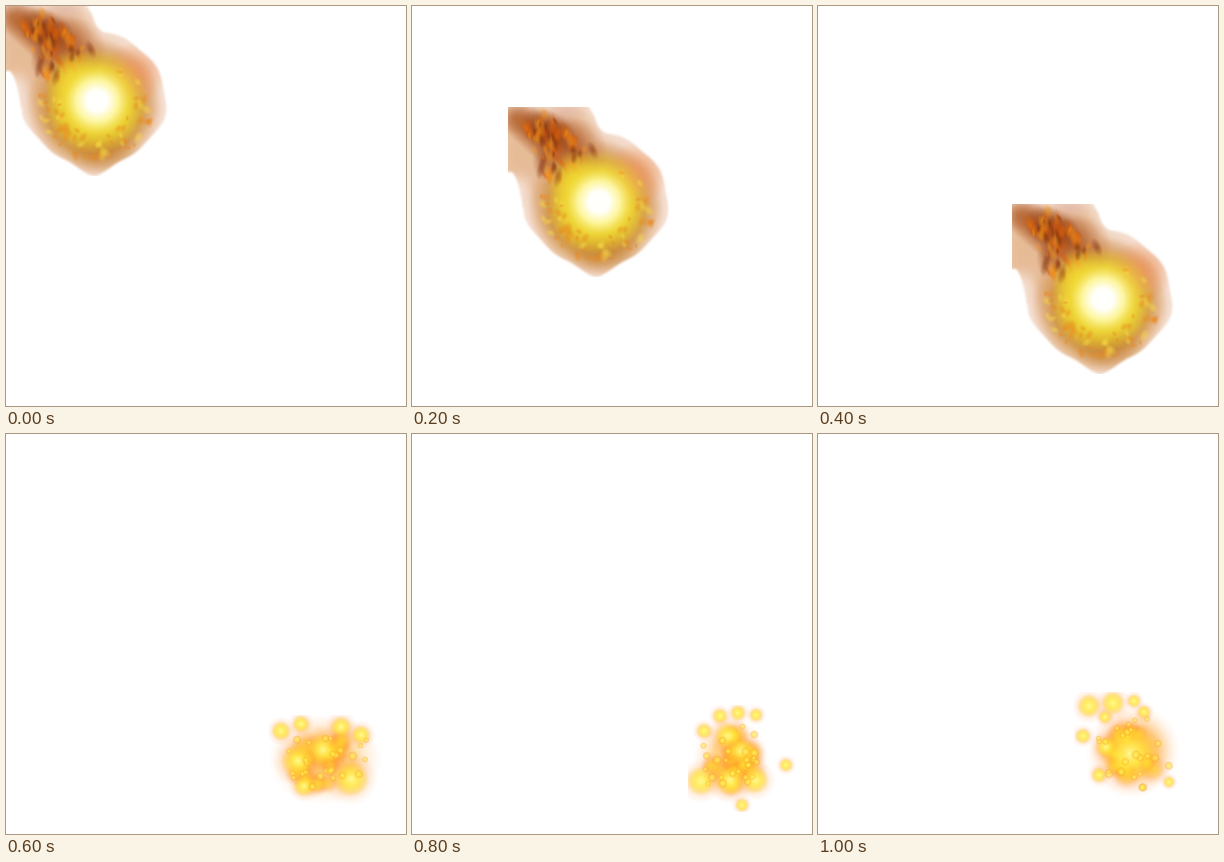
Recreate the animation shown at these times as an HTML page with a canvas. Size 400 by 400 pixels, loop 1.2 s.

```html
<!DOCTYPE html>
<html lang="en">
<head>
<meta charset="utf-8">
<title>Fireball</title>
<style>
  html, body { margin: 0; width: 100%; height: 100%; overflow: hidden; background: #fff; }
  canvas { position: absolute; left: 0; top: 0; opacity: 0; }
</style>
</head>
<body>
<script>
const LOOP = 1200, STEPS = 6;

function layer(x, y, w, h) {
  const c = document.createElement('canvas');
  c.width = w;
  c.height = h;
  c.style.left = x + 'px';
  c.style.top = y + 'px';
  document.body.append(c);
  return c.getContext('2d');
}

function seeded(s) {
  return () => {
    s = (s * 1664525 + 1013904223) % 4294967296;
    return s / 4294967296;
  };
}

// Radial glow; stops are [position, rgb, alpha]
function glow(g, x, y, r, stops, stretch = 1, turn = 0) {
  const grad = g.createRadialGradient(0, 0, 0, 0, 0, r);
  stops.forEach(([at, rgb, a]) => grad.addColorStop(at, `rgba(${rgb},${a})`));
  g.save();
  g.translate(x, y);
  g.rotate(turn);
  g.scale(stretch, 1);
  g.fillStyle = grad;
  g.beginPath();
  g.arc(0, 0, r, 0, 7);
  g.fill();
  g.restore();
}

const fade = (rgb, a) => [[0, rgb, a], [.4, rgb, a * .7], [1, rgb, 0]];

// Ball that narrows towards its lower corners, joined to the tail
function silhouette(g, scale) {
  g.save();
  g.translate(88, 98);
  g.scale(scale, scale);
  g.beginPath();
  for (let a = 0; a < 6.28; a += .05) {
    const r = 72 - 12 * Math.max(0, Math.sin(a) * Math.abs(Math.sin(2 * a))) + Math.sin(9 * a);
    g.lineTo(Math.cos(a) * r, Math.sin(a) * r);
  }
  g.closePath();
  g.fill();
  g.beginPath();
  g.moveTo(-110, -33);
  g.lineTo(-84, -33);
  g.quadraticCurveTo(-77, -26, -73, 4);
  g.lineTo(18, -69);
  g.quadraticCurveTo(2, -72, -1, -88);
  g.lineTo(-14, -110);
  g.lineTo(-110, -110);
  g.fill();
  g.restore();
}

function drawBall(g) {
  const rnd = seeded(11);
  g.filter = 'blur(1px)';
  g.fillStyle = '#f5dfd1';
  silhouette(g, 1);
  g.globalCompositeOperation = 'source-atop';
  g.filter = 'blur(6px)';
  g.fillStyle = 'rgba(226,176,132,.75)';
  silhouette(g, .85);
  g.filter = 'none';

  glow(g, 88, 101, 68, [[0, '240,215,50', 1], [.5, '222,180,44', 1], [.7, '206,146,58', .8], [1, '215,155,105', 0]]);
  glow(g, 128, 68, 32, fade('236,146,90', .8));
  glow(g, 98, 146, 26, fade('190,118,40', .5), 1.5);

  // Smoke widening from the corner into the ball
  for (let i = 0; i < 8; i++) {
    const t = i / 7;
    glow(g, 6 + 60 * t, 10 + 34 * t, 18 + 16 * t, fade('168,78,24', .5));
  }
  glow(g, 40, 24, 20, fade('122,42,10', .6), 1.5, .4);
  glow(g, 36, 54, 20, fade('150,66,20', .55), .6);
  glow(g, 58, 4, 14, fade('222,176,158', .6), 1.6);
  glow(g, 64, 70, 30, fade('240,206,44', .85), .8, .6);

  // Flames curling along the tail
  const colors = ['228,112,12', '244,150,24', '130,48,10', '210,88,10'];
  for (let i = 0; i < 70; i++) {
    const t = rnd(), side = (rnd() - .5) * (20 + 44 * t);
    glow(g, 24 + 40 * t + side * .75, 10 + 52 * t - side * .65, 2 + rnd() * 3,
      fade(colors[i % 4], .55), 1.5 + rnd() * 1.5, .9 + rnd());
  }

  glow(g, 91, 95, 52, [[0, '255,255,255', 1], [.2, '255,255,250', 1], [.4, '255,250,170', .92],
    [.62, '244,226,62', .7], [1, '235,205,40', 0]]);

  // Embers around the rim
  for (let i = 0; i < 60; i++) {
    const a = rnd() * 4.2 - .9, r = 34 + rnd() * 24;
    glow(g, 90 + Math.cos(a) * r, 96 + Math.sin(a) * r, 2 + rnd() * 3,
      fade(i % 3 ? '232,136,28' : '250,222,70', .5), 1.5, rnd() * 3);
  }
}

// Crop box, haze as x, y, radius, stretch, and the largest puffs as x, y, radius
const BLASTS = [
  {
    box: [263, 281, 115, 91], haze: [319, 325, 46, 1.25], seed: 5,
    puffs: [[317, 316, 17], [292, 327, 17], [345, 345, 18], [275, 297, 10], [295, 290, 9], [335, 293, 11],
      [355, 301, 10], [298, 352, 11]]
  },
  {
    box: [276, 271, 107, 107], haze: [319, 326, 43, .9], seed: 8,
    puffs: [[289, 347, 15], [318, 346, 16], [343, 346, 14], [316, 302, 14], [329, 317, 14], [308, 282, 8],
      [326, 279, 8], [344, 281, 7], [292, 297, 8], [374, 331, 7], [330, 371, 7]]
  },
  {
    box: [256, 258, 105, 105], haze: [317, 316, 46, 1], seed: 21,
    puffs: [[312, 320, 30], [288, 313, 11], [271, 272, 12], [295, 269, 12], [316, 267, 7], [287, 283, 7],
      [326, 278, 7], [265, 302, 8], [281, 341, 8], [351, 348, 6]]
  }
];

const HALO = [[0, '255,190,110', .5], [.5, '255,190,120', .4], [1, '255,205,175', 0]];
const PUFF = [[0, '255,252,150', .95], [.35, '255,240,75', .8], [.65, '255,226,50', .5], [1, '255,205,60', 0]];
const SPARK = [[0, '255,244,110', .7], [.45, '255,220,60', .6], [.75, '246,172,44', .4], [1, '250,160,60', 0]];

function drawBlast(g, { box: [left, top, w, h], haze: [hx, hy, hr, wide], puffs, seed }) {
  const rnd = seeded(seed);
  const scatter = (reach, size) => {
    const a = rnd() * 6.28, d = hr * reach * Math.sqrt(rnd());
    return [hx + Math.cos(a) * d * wide, hy + Math.sin(a) * d, size * (.7 + rnd() * .6)];
  };
  const mid = Array.from({ length: 16 }, () => scatter(.62, 9));
  const small = Array.from({ length: 26 }, () => scatter(.85, 4));

  g.fillStyle = '#fff';
  g.fillRect(0, 0, w, h);
  g.translate(-left, -top);
  glow(g, hx, hy, hr, [[0, '255,176,36', .8], [.5, '255,182,56', .55], [.75, '255,196,120', .25], [1, '255,215,190', 0]], wide);
  g.globalCompositeOperation = 'multiply';
  [...puffs, ...mid].forEach(([x, y, r]) => glow(g, x, y, r * 1.5, HALO));
  g.globalCompositeOperation = 'source-over';
  mid.forEach(([x, y, r]) => glow(g, x, y, r, fade('255,222,50', .6)));
  puffs.forEach(([x, y, r]) => glow(g, x, y, r, PUFF));
  small.forEach(([x, y, r]) => glow(g, x, y, r, SPARK));
}

function play(g, frames) {
  g.canvas.animate(frames.map(f => ({ easing: 'steps(1, end)', ...f })), { duration: LOOP, iterations: Infinity });
}

const ball = layer(0, 0, 162, 170);
drawBall(ball);
const stops = [[0, 0], [96, 101], [194, 198]];
const last = { opacity: 0, transform: 'translate(194px, 198px)' };
play(ball, [
  ...stops.map(([x, y], i) => ({ offset: i / STEPS, opacity: 1, transform: `translate(${x}px, ${y}px)` })),
  { offset: 3 / STEPS, ...last },
  { offset: 1, ...last }
]);

BLASTS.forEach((blast, i) => {
  const g = layer(...blast.box);
  drawBlast(g, blast);
  const from = (3 + i) / STEPS, to = (4 + i) / STEPS;
  const frames = [{ offset: 0, opacity: 0 }, { offset: from, opacity: 1 }];
  if (to < 1) frames.push({ offset: to, opacity: 0 });
  frames.push({ offset: 1, opacity: 0 });
  play(g, frames);
});
</script>
</body>
</html>
```
